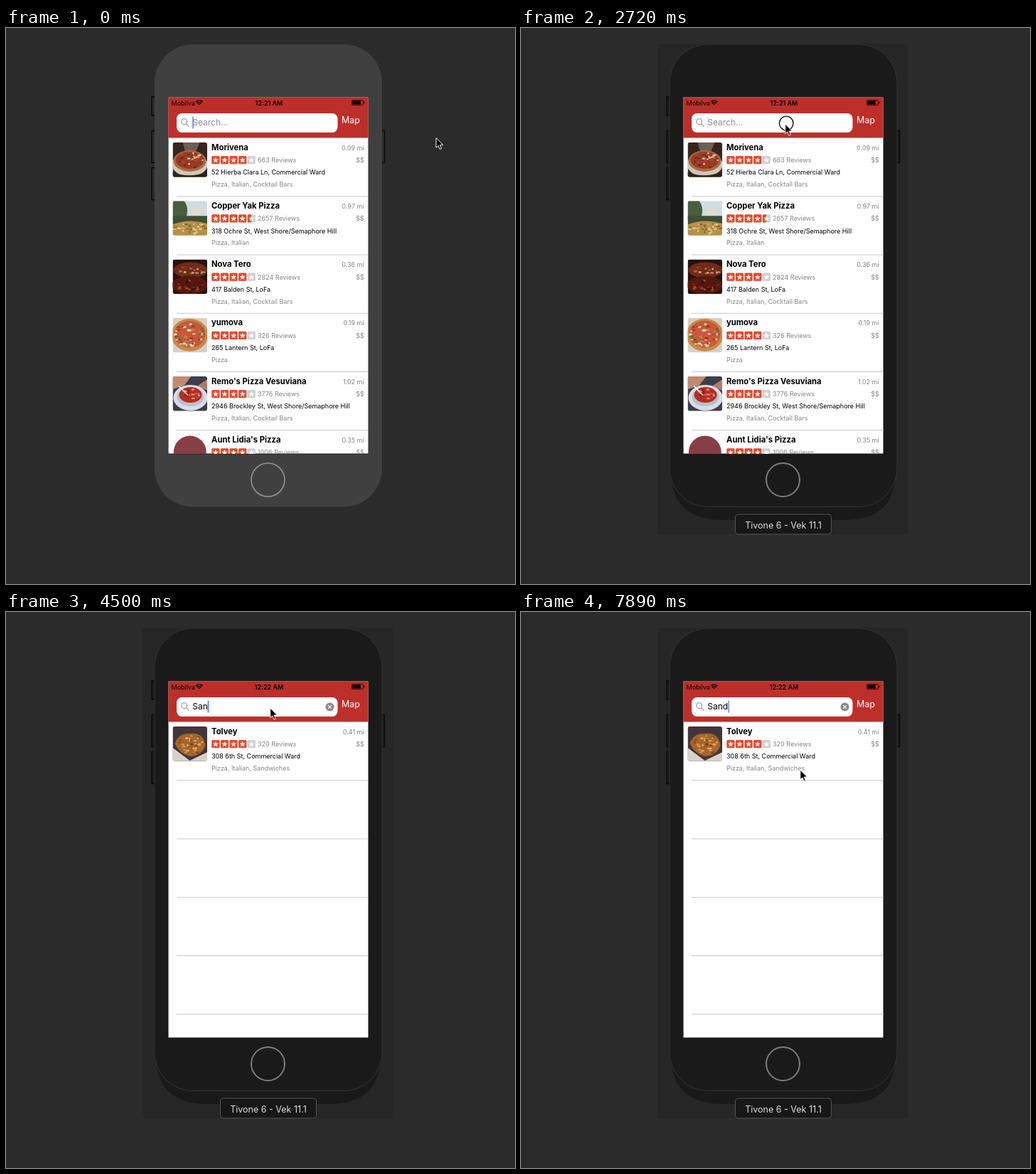
Recreate the animation shown at these times as an HTML page. Size 716 px wide and 782 px high, loop 8 s.

```html
<!DOCTYPE html>
<html lang="en">
<head>
<meta charset="utf-8">
<title>Restaurant search</title>
<style>
html, body { margin: 0; width: 100%; height: 100%; overflow: hidden; background: #2b2b2b; }
svg { display: block; width: 716px; height: 782px; }
text { font: 400 9px Inter, "Open Sans", sans-serif; fill: #000; white-space: pre; }
.name { font-size: 11.25px; font-weight: 700; }
.soft { fill: #858585; }
.end { text-anchor: end; }
.mid { text-anchor: middle; }
.clock { font-weight: 600; }
.field { font-size: 12px; }
.map { font-size: 12.5px; fill: #fff; }
.tip text { font-size: 12.5px; fill: #dedede; }

.active, .idle, .tip, .cast, .tap, .early, .late, .all, .some, .one, .two, .three, .four, .caret, .caret rect, .cursor {
  animation: 8s step-end infinite;
}
.active { animation-name: active; }
.idle { animation-name: idle; }
.tip { animation-name: tip; }
.cast { animation-name: cast; }
.tap { animation-name: tap; }
.early { animation-name: early; }
.late { animation-name: late; }
.all { animation-name: all; }
.some, .two { animation-name: some; }
.one { animation-name: one; }
.three { animation-name: three; }
.four { animation-name: four; }
.caret { animation-name: advance; }
.caret rect { animation-name: blink; }
.cursor { animation-name: move; }

@keyframes active { 0% { opacity: 0 } 34%, 100% { opacity: 1 } }
@keyframes idle { 0% { opacity: 1 } 34%, 100% { opacity: 0 } }
@keyframes tip { 0% { opacity: 0 } 32.125%, 100% { opacity: 1 } }
@keyframes cast { 0% { opacity: 0 } 32.125% { opacity: 1 } 34%, 100% { opacity: 0 } }
@keyframes tap { 0% { opacity: 0 } 34% { opacity: 1 } 35.875%, 100% { opacity: 0 } }
@keyframes early { 0% { opacity: 1 } 43.25%, 100% { opacity: 0 } }
@keyframes late { 0% { opacity: 0 } 43.25%, 100% { opacity: 1 } }
@keyframes all { 0% { opacity: 1 } 52.5%, 100% { opacity: 0 } }
@keyframes some { 0% { opacity: 0 } 52.5% { opacity: 1 } 56.25%, 100% { opacity: 0 } }
@keyframes one { 0% { opacity: 0 } 56.25%, 100% { opacity: 1 } }
@keyframes three { 0% { opacity: 0 } 56.25% { opacity: 1 } 61.875%, 100% { opacity: 0 } }
@keyframes four { 0% { opacity: 0 } 61.875%, 100% { opacity: 1 } }
@keyframes advance {
  0% { transform: translateX(0) }
  52.5% { transform: translateX(14.2px) }
  56.25% { transform: translateX(21.5px) }
  61.875%, 100% { transform: translateX(29px) }
}
@keyframes blink {
  0% { opacity: .8 } 1.875% { opacity: 1 } 7.375% { opacity: .2 } 13.75% { opacity: 1 }
  19.125% { opacity: .5 } 21% { opacity: .2 } 26.625% { opacity: 1 } 32.125% { opacity: .2 }
  35.875% { opacity: 1 } 41.375% { opacity: .5 } 43.25% { opacity: .2 } 48.75% { opacity: .6 }
  50.625% { opacity: 1 } 69.125% { opacity: .2 } 74.625% { opacity: .85 } 80.125% { opacity: .2 }
  85.75% { opacity: 1 } 93.125% { opacity: .5 } 94.875% { opacity: .2 } 98.625%, 100% { opacity: .75 }
}
@keyframes move {
  0% { transform: translate(605px, 154.5px) }
  24.75% { transform: translate(594px, 155px) }
  26.625% { transform: translate(540px, 150px) }
  28.5% { transform: translate(450px, 142px) }
  30.25% { transform: translate(388px, 137px) }
  32.125% { transform: translate(372.8px, 134.5px) }
  34% { transform: translate(371.6px, 135px) }
  65.5% { transform: translate(367px, 150px) }
  67.375% { transform: translate(346px, 204px) }
  69.125% { transform: translate(327px, 240px) }
  71% { transform: translate(317px, 234px) }
  72.75% { transform: translate(318px, 228px) }
  74.625% { transform: translate(322.7px, 225px) }
  76.5% { transform: translate(330px, 225px) }
  78.375% { transform: translate(338px, 225px) }
  80.125% { transform: translate(346px, 225px) }
  82% { transform: translate(355px, 224px) }
  83.875% { transform: translate(364px, 224px) }
  85.75% { transform: translate(372px, 223px) }
  87.625% { transform: translate(380px, 223px) }
  89.375% { transform: translate(386px, 222px) }
  91.25% { transform: translate(390px, 222px) }
  93.125%, 100% { transform: translate(392.7px, 222px) }
}
</style>
</head>
<body>
<svg viewBox="0 0 716 782">
  <defs>
    <clipPath id="photo"><rect width="48.5" height="48.5" rx="3"/></clipPath>
    <clipPath id="screen"><rect x="228.5" y="97.5" width="281" height="501"/></clipPath>
    <g id="keys">
      <path d="M209 97h-4v26h4M209 144.500h-4v45h4M209 196.500h-4v45h4M528.500 144.500h4v45h-4"/>
    </g>
    <rect id="shell" x="209" y="23" width="320" height="650.500" rx="54"/>
  </defs>

  <g class="idle">
    <use href="#keys" fill="#2b2b2b" stroke="#080808" stroke-width="1.3"/>
    <use href="#shell" fill="#404040"/>
    <circle cx="368.500" cy="635.500" r="23.500" fill="none" stroke="#929292" stroke-width="1.6"/>
  </g>
  <g class="cast">
    <path d="M302 674H508V712H302Z" fill="#282828"/>
    <path d="M302 674H508Q490 685 455 685H302Z" fill="#222"/>
  </g>
  <g class="active">
    <path d="M192 22H544V712H192Z" fill="#262626"/>
    <path d="M211 630C214 672 238 692 285 692H455C500 692 524 672 527 630Z" fill="#191919"/>
    <use href="#keys" fill="#1a1a1a" stroke="#080808" stroke-width="1.3"/>
    <use href="#shell" fill="#1a1a1a" stroke="#333"/>
    <circle cx="368.500" cy="635.500" r="23.500" fill="none" stroke="#7c7c7c" stroke-width="2"/>
  </g>

  <rect x="228" y="97" width="282" height="502.500" fill="#1c1c1c"/>
  <g clip-path="url(#screen)">
    <path d="M228 97H510V599H228Z" fill="#fff"/>
    <path d="M228 97H510V154.500H228Z" fill="#bd2f2a"/>
    <path id="lines" stroke="#c8c7cc" fill="none"/>
    <g id="all" class="all"></g>
    <g id="some" class="some"></g>
    <g id="one" class="one"></g>

    <text x="232.500" y="108.500">Mobilva</text>
    <g fill="none" stroke="#000" stroke-width="1.5">
      <path d="M266.800 104a7 7 0 0 1 9.800 0M268.700 106a4.400 4.400 0 0 1 6 0"/>
      <path d="M271.700 108.600l-1.500-1.500a2.200 2.200 0 0 1 3 0Z" fill="#000" stroke="none"/>
    </g>
    <text class="mid clock early" x="370" y="108.500">12:21 AM</text>
    <text class="mid clock late" x="370" y="108.500">12:22 AM</text>
    <rect x="486.500" y="101.500" width="16" height="7" rx="1.500" fill="none" stroke="#000" stroke-width=".7"/>
    <path d="M487.500 102.500h11.500v5h-11.500ZM503.500 103.800h1v2.400h-1Z"/>

    <rect x="240" y="120" width="226.500" height="27" rx="7.500" fill="#fff"/>
    <g fill="none" stroke="#8e8e93" stroke-width="1.1">
      <circle cx="250.700" cy="131.700" r="3.900"/>
      <path d="M253.600 134.700l3.700 4"/>
    </g>
    <text class="field all" x="262.300" y="137.300" style="fill:#8e8e93">Search...</text>
    <text class="field two" x="262.300" y="137.300">Sa</text>
    <text class="field three" x="262.300" y="137.300">San</text>
    <text class="field four" x="262.300" y="137.300">Sand</text>
    <g class="caret"><rect x="262.300" y="124.500" width="1.500" height="17" fill="#3465dd"/></g>
    <g class="two"><use href="#clear"/></g>
    <g class="one" id="clear">
      <circle cx="455.500" cy="133.500" r="6" fill="#8a8a8a"/>
      <path d="M453.200 131.200l4.600 4.600m0-4.600l-4.600 4.600" stroke="#fff" stroke-width="1.200"/>
    </g>
    <text class="map" x="472" y="133.700">Map</text>
  </g>

  <g class="tip">
    <rect x="301.500" y="684" width="135" height="28" rx="4" fill="#171717" stroke="#555"/>
    <text class="mid" x="369" y="703.500">Tivone 6 - Vek 11.1</text>
  </g>
  <circle class="tap" cx="373.200" cy="134" r="9.800" fill="none" stroke="#000" stroke-width="1.300"/>
  <path class="cursor" d="M0 0V13.800L3.100 10.900L5.300 16L7.600 15L5.500 10H9.800Z" stroke="#fff" stroke-width="1"/>
</svg>

<script>
const PITCH = 82.25, TOP = 154.5;

function spots(seed, n, cx, cy, rx, ry, colors) {
  const rnd = () => (seed = seed * 16807 % 2147483647) / 2147483647;
  let out = "";
  for (let i = 0; i < n; i++) {
    const a = rnd() * 6.283, r = Math.sqrt(rnd());
    const x = cx + rx * r * Math.cos(a), y = cy + ry * r * Math.sin(a);
    out += `<ellipse cx="${x.toFixed(1)}" cy="${y.toFixed(1)}" rx="${(1 + rnd() * 2).toFixed(1)}" ry="${(.8 + rnd()).toFixed(1)}" fill="${colors[i % colors.length]}"/>`;
  }
  return out;
}
const fill = c => `<path d="M0 0H49V49H0Z" fill="${c}"/>`;
const area = (d, c) => `<path d="${d}" fill="${c}"/>`;
const oval = (x, y, rx, ry, c) => `<ellipse cx="${x}" cy="${y}" rx="${rx}" ry="${ry}" fill="${c}"/>`;

const photos = {
  dark: fill("#35261f") + area("M14 0H38L32 14H18Z", "#6b5f59") + oval(24, 31, 25, 17, "#cfc6ba") +
    oval(24, 26, 23, 15, "#a96a3f") + oval(24, 25, 20, 12, "#9c3824") +
    spots(7, 34, 24, 25, 19, 11, ["#e0c3a2", "#54602f", "#b8492c", "#6d2318"]) + area("M0 42Q24 51 49 41V49H0Z", "#2c2420"),
  park: fill("#cfdde2") + area("M28 8H40V26H28Z", "#dedbd0") + area("M0 0H16Q24 10 18 26H0Z", "#4a5d3d") +
    area("M0 21H49V33H0Z", "#3f4f33") + area("M0 33Q24 24 49 32V49H0Z", "#b98f48") +
    spots(19, 34, 25, 39, 23, 8, ["#6f8a35", "#e0bf75", "#8f5d2c", "#d5d0a0"]),
  oven: fill("#26120d") + oval(25, 15, 24, 11, "#6d2c1a") + oval(24, 36, 25, 13, "#54180f") +
    spots(31, 18, 25, 15, 20, 8, ["#b5653f", "#8c2c19", "#d1a386"]) + spots(5, 22, 24, 36, 22, 10, ["#8a2717", "#35120b", "#a65236"]),
  plate: fill("#d9cfc2") + oval(24, 24, 26, 23, "#c78a4a") + oval(24, 23, 22, 19, "#c9583a") +
    spots(13, 48, 24, 23, 21, 18, ["#edd0a0", "#557238", "#d8764a", "#9a3324", "#f0e1c4"]),
  bowl: fill("#3a3f4a") + area("M0 0H26L16 13L0 18Z", "#c08b74") + area("M49 4L34 14L49 20Z", "#b07c68") +
    oval(25, 30, 24, 18, "#d9dce4") + oval(25, 29, 19, 13, "#b8bfcc") + oval(25, 26, 16, 11, "#b32e22") +
    spots(23, 22, 25, 25, 13, 8, ["#d04a35", "#8c1f18", "#d98d7c"]) + area("M8 14l1.500-1L22 26l-1 1Z", "#eee"),
  fries: fill("#41363a") + area("M0 30L24 48L49 36V49H0Z", "#d8d2c9") + area("M3 24Q8 9 24 10Q44 8 46 27Q40 42 24 42Q9 38 3 24Z", "#a5642b") +
    spots(41, 44, 25, 26, 19, 13, ["#d29246", "#82451f", "#e0ad64", "#b56a2c"]),
  mark: `<circle cx="24.300" cy="24.300" r="23" fill="#873f45"/>`
};

const star = Array.from({ length: 10 }, (_, i) => {
  const a = i * Math.PI / 5, r = i % 2 ? 1.8 : 4.4;
  return (5.6 + r * Math.sin(a)).toFixed(2) + "," + (5.9 - r * Math.cos(a)).toFixed(2);
}).join(" ");

function stars(score) {
  let out = "";
  for (let i = 0; i < 5; i++) {
    const part = Math.max(0, Math.min(1, score - i)) * 11.2;
    out += `<g transform="translate(${289.3 + i * 12.6} 25.6)"><rect width="11.200" height="11.200" rx="1.500" fill="#d0d0d0"/>` +
      `<rect width="${part}" height="11.200" rx="1.500" fill="#e9492c"/><polygon points="${star}" fill="#fff"/></g>`;
  }
  return out;
}

const label = (x, y, cls, s) => `<text x="${x}" y="${y}" class="${cls}">${s}</text>`;

function row([name, photo, score, count, place, kind, miles], i) {
  return `<g transform="translate(0 ${TOP + i * PITCH})">
    <g transform="translate(234.500 6.500)" clip-path="url(#photo)">${photos[photo]}</g>
    ${label(289, 17.2, "name", name)}${stars(score)}
    ${label(354, 34.6, "soft", count + " Reviews")}
    ${label(289, 51.8, "", place)}${label(289, 68.5, "soft", kind)}
    ${label(503.7, 17, "soft end", miles + " mi")}${label(503.7, 34.6, "soft end", "$$")}
  </g>`;
}

const bars = "Pizza, Italian, Cocktail Bars";
const places = [
  ["Morivena", "dark", 4, 663, "52 Hierba Clara Ln, Commercial Ward", bars, "0.09"],
  ["Copper Yak Pizza", "park", 4.5, 2657, "318 Ochre St, West Shore/Semaphore Hill", "Pizza, Italian", "0.97"],
  ["Nova Tero", "oven", 4, 2824, "417 Balden St, LoFa", bars, "0.36"],
  ["yumova", "plate", 4, 326, "265 Lantern St, LoFa", "Pizza", "0.19"],
  ["Remo's Pizza Vesuviana", "bowl", 4, 3776, "2946 Brockley St, West Shore/Semaphore Hill", bars, "1.02"],
  ["Aunt Lidia's Pizza", "mark", 4, 1006, "730 Calder St, LoFa", "Pizza", "0.35"],
  ["Tolvey", "fries", 4, 320, "308 6th St, Commercial Ward", "Pizza, Italian, Sandwiches", "0.41"]
];
const show = (id, list) => document.getElementById(id).innerHTML = list.map(row).join("");
show("all", places.slice(0, 6));
show("some", [0, 2, 4, 5, 6].map(i => places[i]));
show("one", places.slice(6));
document.getElementById("lines").setAttribute("d",
  [1, 2, 3, 4, 5].map(i => `M240 ${TOP + i * PITCH}H510`).join(""));
</script>
</body>
</html>
```
